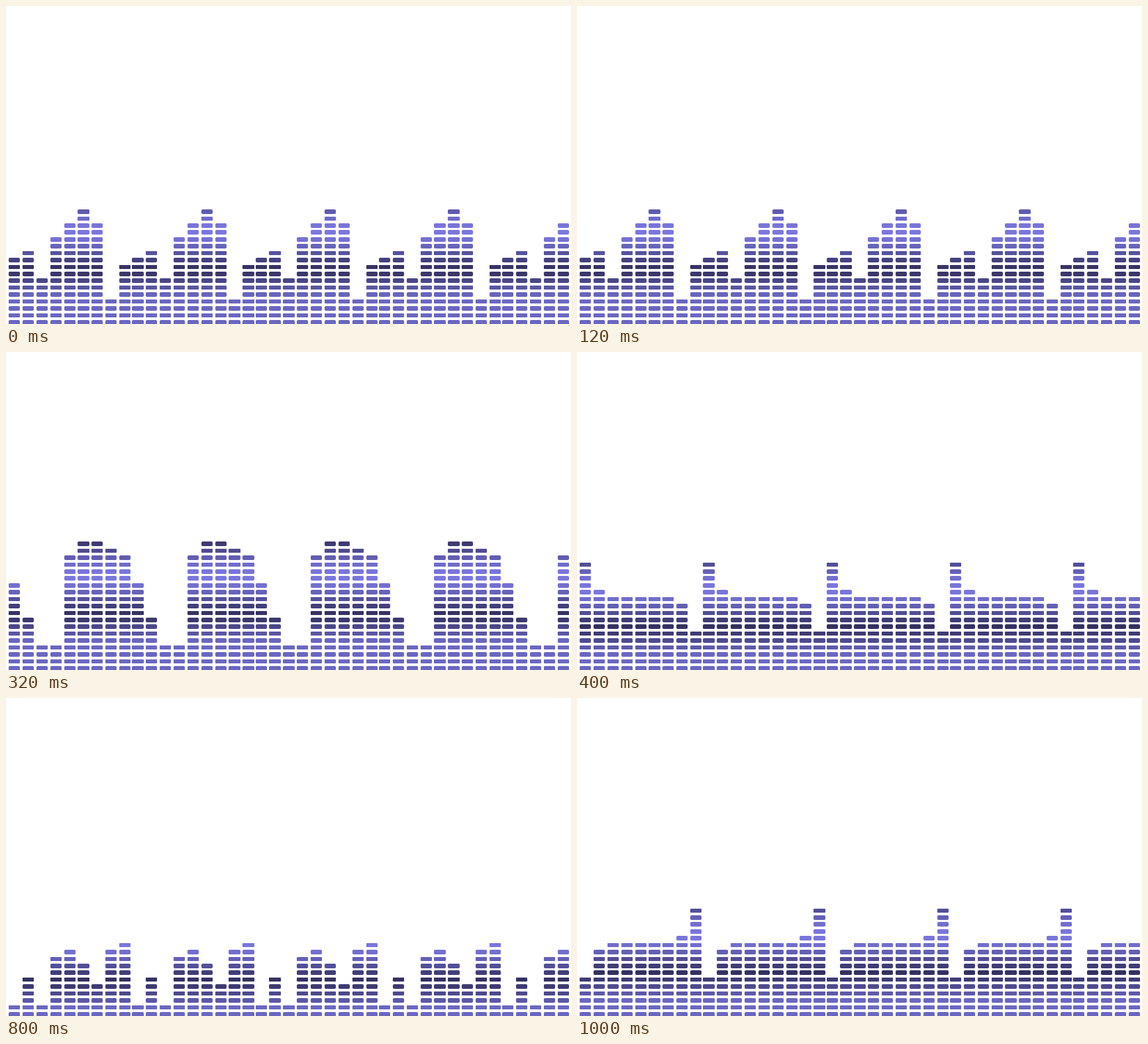
Animation of 853x480 px, one loop 1060 ms. Source, as an HTML page:

```html
<!DOCTYPE html>
<html lang="en">
<head>
<meta charset="utf-8">
<title>Equalizer</title>
<style>
  html, body { margin: 0; width: 100%; height: 100%; overflow: hidden; background: #fff; }
  svg { display: block; width: 100%; height: 100%; }
</style>
</head>
<body>
<svg id="stage" viewBox="0 0 853 480"></svg>
<script>
const LOOP = 1060;
const COLUMNS = 41;
const ROWS = 19;
const BARS = 9;             // bars in one repeat of the pattern
const REPEAT_WIDTH = 186.3;
const BAR_PITCH = 20.88;
const BAR_WIDTH = 17.2;
const ROW_PITCH = 10.425;
const BLOCK_HEIGHT = 6.6;

// Each profile gives the highest lit row of a bar.
const jagged = bar => [9, 10, 6, 12, 14, 16, 14, 3, 8][bar];
const arch = bar => Math.max(3, 17.95 - 0.36 * Math.abs((bar + 5) % BARS - 1.82) ** 2.4);
const slope = bar => 10 + 5 * ((4 - bar) / 4) ** 5;
const mirroredSlope = bar => slope(BARS - 1 - bar);
const low = bar => [1, 5, 1, 8, 9, 7, 4, 9, 10][bar];

// darkRow is where the vertical shading is darkest.
const poses = [
  { start: 0, profile: jagged, darkRow: 7.5 },
  { start: 200, profile: arch, darkRow: 7.6 },
  { start: 400, profile: slope, darkRow: 5.8 },
  { start: 800, profile: low, darkRow: 4.7 },
  { start: 1000, profile: mirroredSlope, darkRow: 5.8 }
];

const stage = document.getElementById("stage");
const blocks = [];

function addBlock(column, row) {
  const bar = column % BARS;
  const left = 4 + Math.floor(column / BARS) * REPEAT_WIDTH + bar * BAR_PITCH;
  const top = 474.5 - row * ROW_PITCH;
  const x = Math.round(left);
  const y = Math.floor(top);
  const width = Math.round(left + BAR_WIDTH) - x;
  const height = Math.floor(top + BLOCK_HEIGHT) - y;
  const node = document.createElementNS("http://www.w3.org/2000/svg", "rect");
  const attributes = { x, y, width, height, rx: height > 6 ? 2 : 1 };
  for (const name in attributes) node.setAttribute(name, attributes[name]);
  stage.append(node);
  blocks.push({ node, bar, row });
}

for (let column = 0; column < COLUMNS; column++) {
  for (let row = 0; row < ROWS; row++) addBlock(column, row);
}

// A ramp below the darkest row, a bright hump above it.
function shade(row, darkRow) {
  const rise = row - darkRow;
  const level = rise < 0
    ? Math.min(7, -1.9 * rise)
    : 9 * Math.abs(Math.sin(Math.PI * rise / 11.5)) ** 1.5;
  const channel = (base, gain) => Math.round(base + gain * level);
  return `rgb(${channel(51, 8)},${channel(47, 7.9)},${channel(95, 14.2)})`;
}

let shown;
function render(time) {
  const phase = time % LOOP;
  const pose = poses.findLast(p => phase >= p.start);
  if (pose === shown) return;
  shown = pose;
  for (const { node, bar, row } of blocks) {
    const lit = row <= Math.round(pose.profile(bar));
    node.setAttribute("visibility", lit ? "visible" : "hidden");
    node.setAttribute("fill", shade(row, pose.darkRow));
  }
}

const begin = performance.now();
function tick() {
  render(performance.now() - begin);
  requestAnimationFrame(tick);
}
tick();
</script>
</body>
</html>
```
